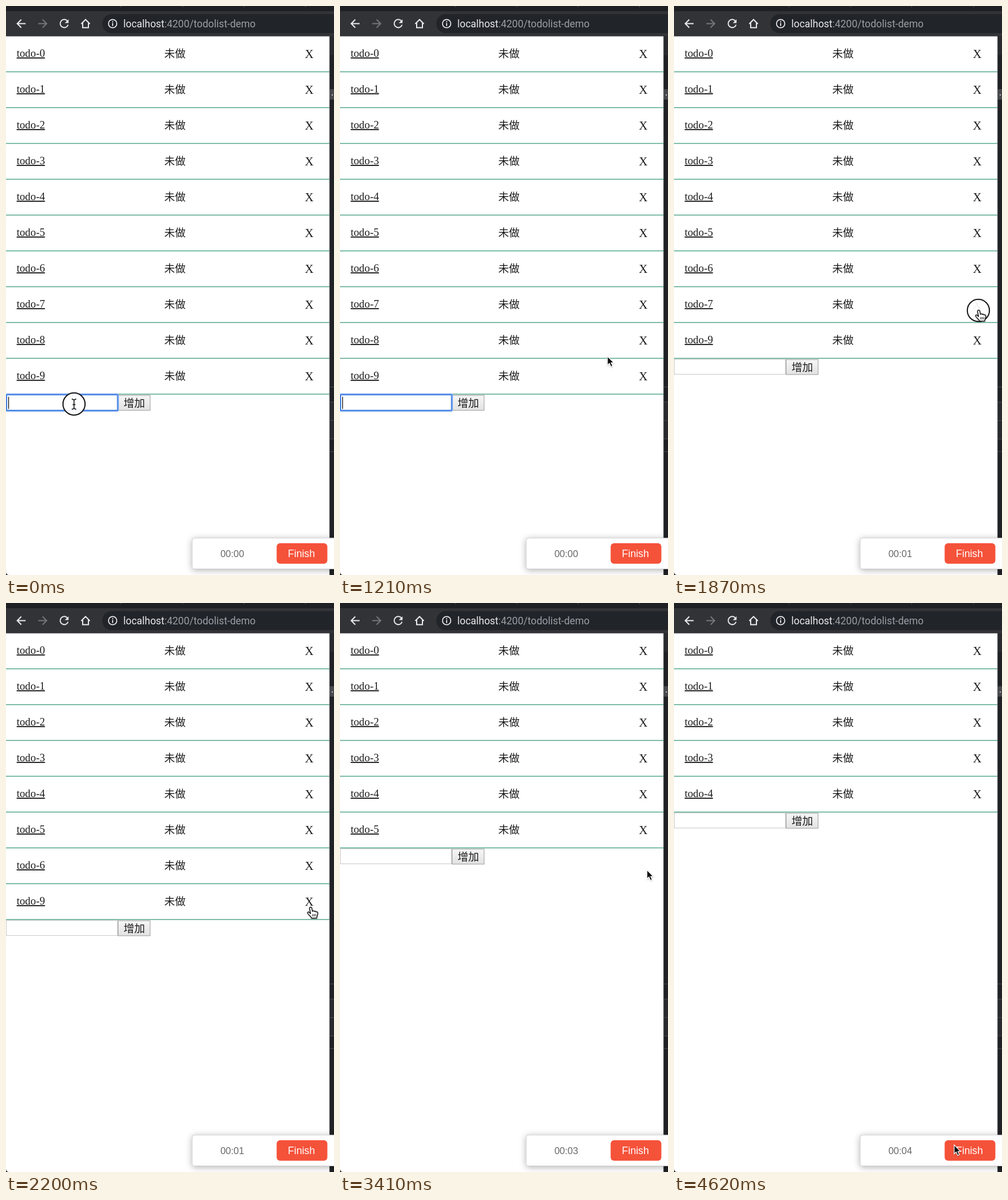
An HTML page that plays this animation: 569 px wide and 985 px high, repeating every 4.73 s.

```html
<!DOCTYPE html>
<html lang="zh">
<head>
<meta charset="utf-8">
<title>Todo list</title>
<style>
html, body { margin: 0; width: 100%; height: 100%; overflow: hidden; background: #fff; }
svg { display: block; width: 569px; height: 985px; }
text { white-space: pre; }
.serif { font-family: "Liberation Serif", Times, serif; font-size: 18.8px; fill: #1c1c1c; }
.link { text-decoration: underline; }
.cjk { font-family: "Noto Sans CJK SC", "Noto Sans CJK", sans-serif; font-weight: 300; font-size: 18.6px; fill: #1c1c1c; }
.url { font-family: Roboto, sans-serif; font-size: 17.45px; fill: #e8eaed; }
.sans { font-family: "Liberation Sans", Arial, sans-serif; }
.icon { fill: none; stroke: #e8eaed; stroke-width: 2; }
</style>
</head>
<body>
<svg viewBox="0 0 569 985">
  <defs>
    <linearGradient id="face" x2="0" y2="1">
      <stop stop-color="#f6f6f6"/><stop offset="1" stop-color="#e2e2e2"/>
    </linearGradient>
    <filter id="shadow" x="-20%" y="-60%" width="140%" height="220%">
      <feDropShadow dx="0" dy="2" stdDeviation="6" flood-opacity=".3"/>
    </filter>
    <filter id="soft" x="-50%" y="-50%" width="200%" height="200%">
      <feDropShadow dx="0" dy="1" stdDeviation="1" flood-opacity=".3"/>
    </filter>
  </defs>

  <rect width="569" height="985" fill="#fff"/>

  <!-- browser bar -->
  <rect width="569" height="52.5" fill="#323337"/>
  <rect width="569" height="9" fill="#1f2023"/>
  <path d="M199.5 0v2M306.5 0v2M412.5 0v2M519.5 0v2" stroke="#55575b"/>
  <rect x="167" y="14" width="430" height="33" rx="16.5" fill="#212429"/>
  <g class="icon">
    <path d="M34 30.500H19.500M26.500 23.500l-7 7 7 7"/>
    <path d="M56 30.500H70.500M63.500 23.500l7 7-7 7" stroke="#75777b"/>
    <path d="M106.500 26A7 7 0 1 0 107.700 32.500"/>
    <path d="M108.500 23v6.500H102z" fill="#e8eaed" stroke="none"/>
    <path d="M130.500 31l7.500-7.500 7.500 7.500M133 29.500v8h10v-8"/>
    <circle cx="185" cy="30.500" r="7.200" stroke-width="1.700"/>
    <path d="M185 29.500v5M185 26.300v1.900" stroke-width="1.800"/>
  </g>
  <text class="url" x="203.500" y="36.500">localhost<tspan fill="#9aa0a6">:4200/todolist-demo</tspan></text>

  <!-- window behind, right edge -->
  <rect x="561" y="52" width="8" height="933" fill="#202124"/>
  <rect x="561" y="52" width="8" height="33" fill="#292a2d"/>
  <rect x="561" y="144" width="8" height="18" fill="#47484b"/>
  <circle cx="566" cy="154" r="1.200" fill="#b5b7ba"/>
  <rect x="561" y="686" width="8" height="63" fill="#292a2d"/>
  <path d="M561 659.500h8M561 685.500h8M561 717.500h8M561 749.500h8M561 771.500h8" stroke="#46484b"/>
  <path d="M561.300 52.500V985" stroke="#77797c" stroke-width=".8"/>
  <path d="M0 979Q0 985 6 985H0z" fill="#202124"/>

  <g id="rows"></g>

  <g id="form">
    <rect x=".5" y="1.500" width="193" height="26" fill="#fff" stroke="#c9c9c9"/>
    <rect x="194.500" y="2" width="55.500" height="26" fill="url(#face)" stroke="#9a9a9a"/>
    <text class="cjk" x="204" y="22">增加</text>
    <g id="focus">
      <rect x="0" y="0" width="194.500" height="29" rx="2" fill="none" stroke="#8fb4f0" stroke-width="3"/>
      <rect x="1" y="1" width="192.500" height="27" rx="1" fill="#fff" stroke="#4583e2" stroke-width="2"/>
      <path id="caret" d="M4.500 4.500v21" stroke="#111" stroke-width="1.300"/>
    </g>
  </g>

  <!-- recorder panel -->
  <rect x="323" y="921" width="260" height="53.500" rx="4" fill="#fff" stroke="#c4c4c4" stroke-width=".8" filter="url(#shadow)"/>
  <text id="clock" class="sans" x="372" y="953.500" font-size="16.400" fill="#666"></text>
  <rect x="469.500" y="930" width="88" height="35.500" rx="6" fill="#f5523a"/>
  <text class="sans" x="489" y="953.500" font-size="17.600" fill="#fff">Finish</text>

  <g id="pointer">
    <circle id="press" r="19.200" fill="#fff" fill-opacity=".93" stroke="#151515" stroke-width="2"/>
    <g id="beam" fill="none">
      <path d="M-4-8.500Q0-8.500 0-5.500Q0-8.500 4-8.500M0-6V7M-4 9Q0 9 0 6Q0 9 4 9M-2.500 1h5" stroke="#fff" stroke-width="3"/>
      <path d="M-4-8.500Q0-8.500 0-5.500Q0-8.500 4-8.500M0-6V7M-4 9Q0 9 0 6Q0 9 4 9M-2.500 1h5" stroke="#111" stroke-width="1.500"/>
    </g>
    <g id="hand" stroke="#111" stroke-width="1.400" stroke-linejoin="round" filter="url(#soft)">
      <path fill="#fff" d="M-1.500 1.500C-1.500-1 2-1.200 2.400 1L3.600 7C4 5 6.500 5.400 6.700 7.200C7.500 6 9.600 6.400 9.800 8C11 7 12.800 7.600 12.800 9.400C13 13 11.500 14 11 18.500H2C1 15-3 13-4.600 10C-5.400 8.200-3.600 7-2 8.600L.4 10.600Z"/>
      <path d="M4 11.500v4M6.600 11.500v4M9.200 11.500v4" stroke-width="1.100"/>
    </g>
    <path id="arrow" d="M0 0V15.500L3.500 12.200L6 18.200L9 17L6.500 11.300H11Z" fill="#0b0b0b" stroke="#fff" stroke-width="1.200" filter="url(#soft)"/>
  </g>
</svg>

<script>
const LOOP = 4730, STEP = 110, TOP = 52, ROW = 62;
const $ = id => document.getElementById(id);
const show = (id, on) => $(id).style.display = on ? "" : "none";
const between = (v, a, b) => v >= a && v < b;

// [item, time it disappears]
const removals = [[8, 1650], [7, 2090], [6, 2640], [9, 3190], [5, 3850]];
// [start, end] of each mouse press
const presses = [[0, 220], [1320, 1430], [1870, 1980], [2420, 2530], [2970, 3080], [3630, 3740]];
// [time, x, y] pointer stops
const stops = [
  [0, 118, 689], [880, 118, 689], [1320, 528, 591], [1650, 528, 591],
  [1870, 528, 527], [2200, 528, 527], [2420, 532, 463], [3410, 532.5, 462],
  [3630, 532, 401], [3960, 532, 401], [4510, 486, 938]
];

const rows = Array.from({ length: 10 }, (_, i) => {
  const g = document.createElementNS("http://www.w3.org/2000/svg", "g");
  g.innerHTML = `<text class="serif link" x="18.500" y="36">todo-${i}</text>
    <text class="cjk" x="274.500" y="37.300">未做</text>
    <text class="serif" x="526" y="38" text-anchor="middle" style="font-size:20.800px">X</text>
    <rect y="61.200" width="561" height="1.400" fill="#4ba386"/>`;
  $("rows").append(g);
  return g;
});

function pointerAt(t) {
  const i = stops.findIndex(s => s[0] > t);
  if (i < 0) return stops.at(-1).slice(1);
  const [t0, x0, y0] = stops[i - 1], [t1, x1, y1] = stops[i];
  const u = (t - t0) / (t1 - t0), e = u * u * (3 - 2 * u);
  return [x0 + (x1 - x0) * e, y0 + (y1 - y0) * e];
}

function draw(t) {
  const gone = new Set(removals.filter(r => t >= r[1]).map(r => r[0]));
  let y = TOP;
  rows.forEach((g, i) => {
    g.style.display = gone.has(i) ? "none" : "";
    g.setAttribute("transform", `translate(0 ${y})`);
    if (!gone.has(i)) y += ROW;
  });
  $("form").setAttribute("transform", `translate(0 ${y})`);
  show("focus", t < 1320);
  show("caret", !between(t, 550, 1050));

  const [px, py] = pointerAt(t);
  const onX = py < y && between(px, 515, 540) && between((py - TOP) % ROW, 16, 46);
  const onInput = px < 194 && between(py, y, y + 29);
  $("pointer").setAttribute("transform", `translate(${px} ${py})`);
  show("hand", onX);
  show("beam", onInput);
  show("arrow", !onX && !onInput);
  show("press", presses.some(([a, b]) => between(t, a, b)));

  $("clock").textContent = "00:0" + Math.max(0, Math.floor((t - 320) / 1000));
}

const start = performance.now();
function tick() {
  const t = (performance.now() - start) % LOOP;
  draw(Math.floor(t / STEP) * STEP);
  requestAnimationFrame(tick);
}
draw(0);
requestAnimationFrame(tick);
</script>
</body>
</html>
```
